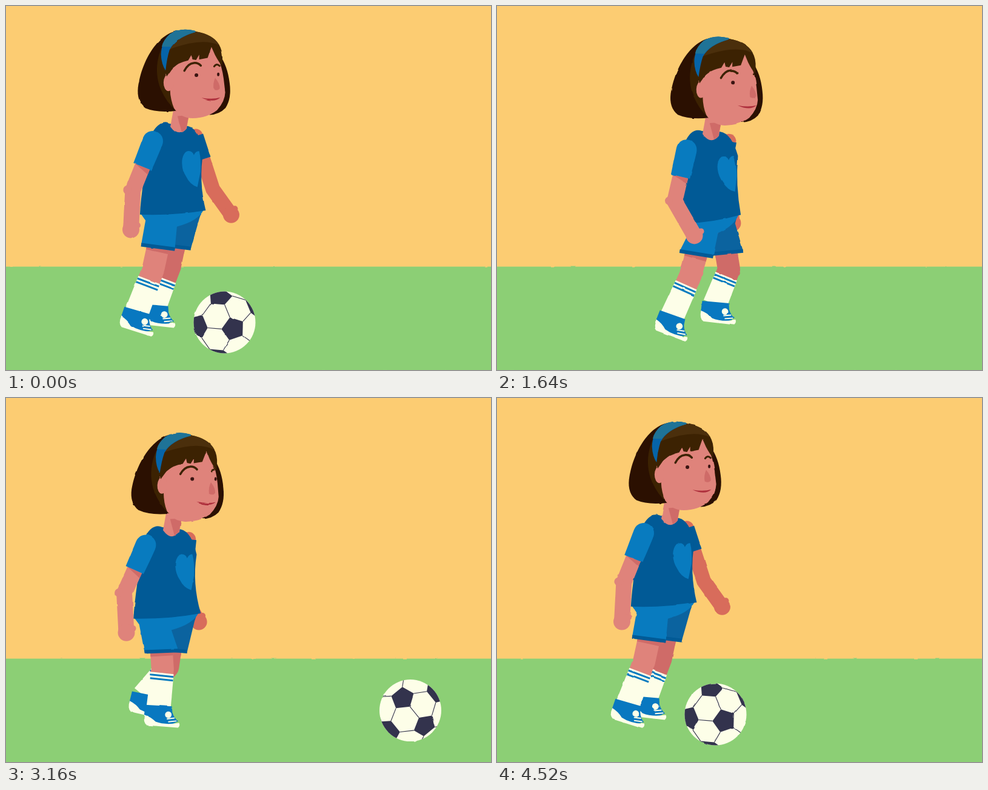
An HTML page with a canvas that plays this animation: 800 px wide and 600 px high, repeating every 4560 ms.

```html
<!DOCTYPE html>
<html lang="en">
<head>
<meta charset="utf-8">
<title>Football practice</title>
<style>
  html, body { margin: 0; width: 100%; height: 100%; overflow: hidden; }
  body { background: linear-gradient(#fccc72 430px, #8dd076 430px); }
  canvas { display: block; filter: url(#rough); }
  svg { position: absolute; width: 0; height: 0; }
</style>
</head>
<body>
<canvas width="800" height="600"></canvas>
<svg><filter id="rough" x="0" y="0" width="1" height="1" color-interpolation-filters="sRGB">
  <feTurbulence type="fractalNoise" baseFrequency="0.06" numOctaves="1" seed="1"/>
  <feDisplacementMap in="SourceGraphic" scale="2.5" xChannelSelector="R" yChannelSelector="G"/>
</filter></svg>
<script>
const LOOP = 4560, STEP = 40;
const c = document.querySelector('canvas').getContext('2d');
const noise = document.querySelector('feTurbulence');

const C = {
  sky: '#fccc72', grass: '#8ccf75', skin: '#df837b', shade: '#cf6b68', farArm: '#d86c5b',
  shirt: '#015a96', blue: '#087bbf', farBlue: '#0b639f', cream: '#fdfee8', ink: '#33334d',
  hair: '#3c2202', hairDark: '#2b1001', hairLight: '#4b2f0c', teal: '#1f7397', band: '#0664a8'
};

// Key poses: time, collar x y, lean, head turn, upper arm, forearm, far arm, foot x y, far foot x y
const POSES = [
  [0, 270, 194, -2, 0, -22, -3, 18, 217, 502, 246, 493],
  [480, 325, 202, 8, -1, -32, 3, -28, 217, 503, 327, 485],
  [800, 335, 196, -2, 2, -22, 8, -10, 415, 480, 315, 498],
  [1640, 338, 206, -7, 6, -13, 30, -12, 290, 509, 361, 488],
  [2440, 267, 211, -2, 0, -26, 3, -7, 280, 510, 244, 486],
  [3160, 258, 213, -3, 3, -24, 3, -6, 252, 507, 230, 488],
  [3840, 251, 197, -5, 0, -22, 9, 2, 239, 493, 243, 488]
];
POSES.push([4440, ...POSES[0].slice(1)]);

// Ball: time, x
const REST = 360.5;
const ROLL = [[0, REST], [660, REST], [1000, 920], [2860, 880], [3160, 667], [3840, 347.5], [4300, REST]];

// Monotone cubic through rows that begin with their time
function sample(rows, t) {
  const last = rows.length - 1;
  if (t >= rows[last][0]) return rows[last].slice(1);
  const i = rows.findIndex((r, k) => t < rows[k + 1][0]);
  const h = rows[i + 1][0] - rows[i][0], s = (t - rows[i][0]) / h;
  const rate = (k, j) => (rows[k + 1][j] - rows[k][j]) / (rows[k + 1][0] - rows[k][0]);
  const slope = (k, j) => {
    if (k === 0 || k === last) return 0;
    const a = rate(k - 1, j), b = rate(k, j);
    return a * b <= 0 ? 0 : 2 * a * b / (a + b);
  };
  return rows[i].map((v, j) => v + (rows[i + 1][j] - v) * s * s * (3 - 2 * s)
    + h * s * (1 - s) * ((1 - s) * slope(i, j) - s * slope(i + 1, j))).slice(1);
}

const rad = d => d * Math.PI / 180;
// Point at a length from p; 0 degrees is down, positive is forward
const swing = ([x, y], deg, len) => [x + len * Math.sin(rad(deg)), y + len * Math.cos(rad(deg))];
// Lets a rotated part be addressed in its own coordinates
const frameAt = (x, y, deg) => (px, py) => {
  const co = Math.cos(rad(deg)), si = Math.sin(rad(deg));
  return [x + px * co - py * si, y + px * si + py * co];
};

const fill = (color, path) => { c.fillStyle = color; path ? c.fill(path) : c.fill(); };
function trace(pts) {
  c.beginPath();
  pts.forEach(p => c.lineTo(...p));
}
function poly(color, pts) {
  trace(pts);
  fill(color);
}
function line(color, width, pts, cap = 'butt') {
  trace(pts);
  Object.assign(c, { strokeStyle: color, lineWidth: width, lineCap: cap, lineJoin: 'round' });
  c.stroke();
}
function oval(color, x, y, rx, ry = rx) {
  c.beginPath();
  c.ellipse(x, y, rx, ry, 0, 0, 7);
  fill(color);
}
function placed([x, y], deg, draw) {
  c.save();
  c.translate(x, y);
  c.rotate(rad(deg));
  draw();
  c.restore();
}

const P = s => new Path2D(s);
const ART = {
  back: P('M285 40C250 42 222 90 217 135Q215 158 230 169Q250 177 283 172L300 110Z'),
  mid: P('M270 45C250 66 240 105 255 138Q264 158 281 173L300 110L300 50Z'),
  far: P('M350 78Q364 96 368 125Q372 150 362 166Q352 177 336 178L320 150L335 90Z'),
  face: P('M262 112L300 80L337 64L348 84Q355 98 358 118L361 140Q361 155 348 170Q332 183 308 184Q288 184 277 168Q271 155 270 138Z'),
  bangs: P('M268 68Q282 46 310 41Q343 46 352 67Q357 78 355 97Q349 90 343 79L337 66L331 84L317 87L317 79L312 88L306 87L304 80L299 89Q283 93 274 101L264 116Q256 95 268 68Z'),
  light: P('M266 72Q282 46 310 41Q340 45 350 63Q330 54 300 61Q280 66 266 72Z'),
  band: P('M310 40Q285 34 268 46Q254 60 254 80Q255 96 262 106Q264 85 268 72Q278 52 310 42Z'),
  bandTop: P('M310 40Q285 34 268 46Q257 56 255 67L270 67Q282 50 310 42Z'),
  brow: P('M293 106Q299 94 308 93Q315 92 320 97'),
  farBrow: P('M342 98Q346 92 351 97'),
  nose: P('M344 117Q352 126 352 134Q349 139 342 136Q340 126 344 117Z'),
  mouth: P('M322 150Q340 153 353 149Q343 159 322 150Z'),
  heart: P('M-16-10C-16-22-10-30-5-30Q2-30 4-23Q8-30 13-29Q16-15 14 5Q10 22 8 30Q-4 26-10 12Q-16 2-16-10Z'),
  sleeve: P('M-16 0L-17-44C-17-68 17-68 17-44Q17-24 16 0Z'),
  shoe: P('M-25 1L24-1L26 10Q30 20 38 25L20 36L-10 35L-25 22Z'),
  sole: P('M-25 19Q-12 22-3 30Q15 35 40 28Q43 33 39 37L-18 38Q-26 34-25 19Z')
};

function drawHead(at, deg, turn) {
  placed(at, deg, () => {
    c.translate(-310, -175);
    fill(C.hairDark, ART.back);
    fill(C.hair, ART.mid);
    fill(C.hairDark, ART.far);
    fill(C.skin, ART.face);
    oval(C.skin, 267, 126, 8, 14);
    c.save();
    c.clip(ART.face);
    c.translate(turn, 0);
    Object.assign(c, { strokeStyle: C.hair, lineWidth: 3.5, lineCap: 'round' });
    c.stroke(ART.brow);
    oval('#3b1512', 313, 113, 3);
    fill(C.shade, ART.nose);
    fill('#ae2f3c', ART.mouth);
    c.translate(Math.max(0, turn * .8), 0);
    c.strokeStyle = C.hair;
    c.lineWidth = 3;
    c.stroke(ART.farBrow);
    oval('#3b1512', 349, 111, 2, 3);
    c.restore();
    fill(C.hair, ART.bangs);
    fill(C.hairLight, ART.light);
    fill(C.band, ART.band);
    fill(C.teal, ART.bandTop);
  });
}

function drawNeck(head, [x, y]) {
  trace([[x + 1, y + 5], head(-34, -4), head(-8, 2), [x + 28, y + 8]]);
  c.quadraticCurveTo(x + 15, y + 24, x + 1, y + 5);
  fill(C.skin);
  poly(C.shade, [head(-27, 6), head(-8, 4), [x + 27, y + 9], [x + 20, y + 14]]);
}

function drawShirt(collar, lean, hem) {
  placed(collar, lean, () => {
    c.beginPath();
    c.moveTo(-hem, 148);
    c.quadraticCurveTo(-50, 100, -30, 15);
    c.quadraticCurveTo(-16, -8, 0, 0);
    c.lineTo(30, 5);
    c.quadraticCurveTo(48, 10, 54, 48);
    c.quadraticCurveTo(44, 95, hem, 145);
    c.quadraticCurveTo(0, 152, -hem, 148);
    fill(C.shirt);
    c.clip();
    c.translate(34, 76);
    fill(C.blue, ART.heart);
  });
}

function drawArm(shoulder, upper, fore) {
  const cuff = swing(shoulder, upper, 45), elbow = swing(shoulder, upper, 87);
  const hand = swing(elbow, fore, 65);
  line(C.skin, 26, [cuff, elbow, hand], 'round');
  oval(C.skin, elbow[0] - 9, elbow[1] - 1, 7);
  oval(C.skin, hand[0] + 11, hand[1] - 7, 5);
  oval(C.skin, ...hand, 14);
  placed(cuff, -upper, () => {
    poly(C.shade, [[-13, 0], [13, 0], [13, 9]]);
    fill(C.blue, ART.sleeve);
  });
}

function drawFarArm(shoulder, upper) {
  const elbow = swing(shoulder, upper, 92), hand = swing(elbow, 32 + upper * .2, 52);
  line(C.farArm, 24, [shoulder, elbow, hand], 'round');
  oval(C.farArm, ...hand, 13.5);
  oval(C.farArm, hand[0] + 6, hand[1] - 10, 5);
  line(C.shirt, 26, [shoulder, swing(shoulder, upper, 40)]);
}

// Knee and trouser cuff of a leg reaching from hip to ankle
function reach(hip, ankle, thigh = 82, shin = 58) {
  const dx = ankle[0] - hip[0], dy = ankle[1] - hip[1], d = Math.hypot(dx, dy);
  const along = (thigh ** 2 - shin ** 2 + d * d) / (2 * d);
  const out = Math.max(6, Math.sqrt(Math.max(0, thigh ** 2 - along ** 2)));
  const knee = [hip[0] + (dx * along + dy * out) / d, hip[1] + (dy * along - dx * out) / d];
  const angle = Math.atan2(knee[0] - hip[0], knee[1] - hip[1]) * 180 / Math.PI;
  const cuff = frameAt(...swing(hip, angle, 54), -angle * .6);
  return { hip, knee, ankle, angle, cuff: [cuff(-28, 0), cuff(28, 0)] };
}

function drawLeg({ hip, knee, ankle, angle }, skin, sock, tilt) {
  line(skin, 37, [hip, knee, ankle]);
  line(C.shade, 37, [swing(hip, angle, 50), swing(hip, angle, 62)]);
  const shin = Math.atan2(knee[0] - ankle[0], ankle[1] - knee[1]) * 180 / Math.PI;
  placed(ankle, shin, () => {
    poly(C.cream, [[-19, -sock], [19, -sock], [20, 4], [-20, 4]]);
    for (const y of [4.5, 10.5]) line(C.blue, 3, [[-19, y - sock], [19, y - sock]]);
  });
  placed(ankle, shin * tilt, () => {
    c.scale(.9, .9);
    fill('#0878c0', ART.shoe);
    fill(C.cream, ART.sole);
    oval(C.cream, 19, 15, 6);
    line(C.cream, 2.2, [[17, 23], [31, 20]]);
    line(C.cream, 2.2, [[20, 28], [35, 25]]);
  });
}

function drawGirl(t) {
  const [x, y, lean, turn, upper, fore, farUpper, nx, ny, fx, fy] = sample(POSES, t);
  const body = frameAt(x, y, lean), tilt = lean + 3 + turn;
  const head = frameAt(x + 40, y - 18, tilt);
  const hem = 56 - .18 * Math.max(0, Math.abs(fx - nx) - 20);
  const near = reach(body(-13, 150), [nx, ny]), far = reach(body(13, 150), [fx, fy]);
  const seam = body(6, 170);

  drawFarArm(body(42, 22), farUpper);
  drawLeg(far, C.shade, 46, .35);
  poly(C.farBlue, [body(0, 140), body(hem - 4, 140), body(hem - 11, 158), far.cuff[1], far.cuff[0], seam]);
  line(C.shirt, 6, far.cuff);
  drawLeg(near, C.skin, 54, .9);
  trace([body(1 - hem, 146), body(9 - hem, 158), ...near.cuff, seam]);
  c.quadraticCurveTo(...body(hem - 12, 162), ...body(hem - 3, 143));
  fill(C.blue);
  line(C.shirt, 6, near.cuff);
  drawShirt([x, y], lean, hem);
  drawNeck(head, [x, y]);
  drawHead(head(0, 0), tilt, turn);
  drawArm(body(-29, 28), upper, fore);
}

// Ball: a truncated icosahedron, seen from the front
const dot = (a, b) => a[0] * b[0] + a[1] * b[1] + a[2] * b[2];
const cross = (a, b) => [a[1] * b[2] - a[2] * b[1], a[2] * b[0] - a[0] * b[2], a[0] * b[1] - a[1] * b[0]];
const mix = (a, m, b, n) => a.map((v, i) => v * m + b[i] * n);
const unit = a => a.map(v => v / Math.hypot(...a));

const front = unit([.26, .19, .95]), hint = [-.12, -.73, .67];
const up = unit(mix(hint, 1, front, -dot(hint, front))), side = cross(front, up);
const centres = [front];
for (let a = 0; a < 360; a += 72) {
  const ring = mix(up, Math.cos(rad(a)), side, Math.sin(rad(a)));
  centres.push(mix(front, 1 / Math.sqrt(5), ring, 2 / Math.sqrt(5)));
}
centres.push(...centres.map(v => v.map(n => -n)));

const patches = [], seams = [];
centres.forEach((a, i) => {
  const near = centres.filter(b => dot(a, b) > .4 && dot(a, b) < .5), first = near[0];
  const turn = b => Math.atan2(dot(a, cross(first, b)), dot(first, b) - dot(first, a) * dot(a, b));
  near.sort((m, n) => turn(m) - turn(n));
  patches.push(near.map(b => unit(mix(a, 2, b, 1))));
  for (const b of near) {
    if (centres.indexOf(b) > i) seams.push([unit(mix(a, 2, b, 1)), unit(mix(b, 2, a, 1))]);
  }
});

function drawBall(t) {
  const R = 51, zoom = R * 1.15, [x] = sample(ROLL, t), dx = x - REST;
  if (x > 855) return;
  const a = dx / R, v = Math.min(20, Math.abs(dx) * .6) / R, u = v * .35;
  const spin = ([px, py, pz]) => {
    const qx = px * Math.cos(a) - py * Math.sin(a), qy = px * Math.sin(a) + py * Math.cos(a);
    const sx = qx * Math.cos(u) + pz * Math.sin(u), sz = pz * Math.cos(u) - qx * Math.sin(u);
    return [sx, qy * Math.cos(v) + sz * Math.sin(v), sz * Math.cos(v) - qy * Math.sin(v)];
  };
  const flat = ([px, py, pz]) => {
    const k = pz < 0 ? zoom / Math.hypot(px, py) : zoom;
    return [px * k, py * k];
  };
  const visible = shapes => shapes.map(s => s.map(spin))
    .filter(s => s.some(q => q[2] > 0)).map(s => s.map(flat));
  placed([x, 521.5 - dx * .021], 0, () => {
    oval(C.cream, 0, 0, R);
    c.clip();
    visible(seams).forEach(s => line(C.ink, 1.1, s));
    visible(patches).forEach(s => poly(C.ink, s));
  });
}

function drawField() {
  c.fillStyle = C.sky;
  c.fillRect(0, 0, 800, 600);
  c.fillStyle = C.grass;
  c.fillRect(0, 429.6, 800, 171);
}

const start = performance.now();
let seed = 0;
function frame() {
  const t = Math.floor((performance.now() - start) % LOOP / STEP) * STEP;
  const next = 1 + Math.floor(t / 160);
  if (next !== seed) noise.setAttribute('seed', seed = next);
  drawField();
  drawGirl(t);
  drawBall(t);
  requestAnimationFrame(frame);
}
frame();
</script>
</body>
</html>
```
